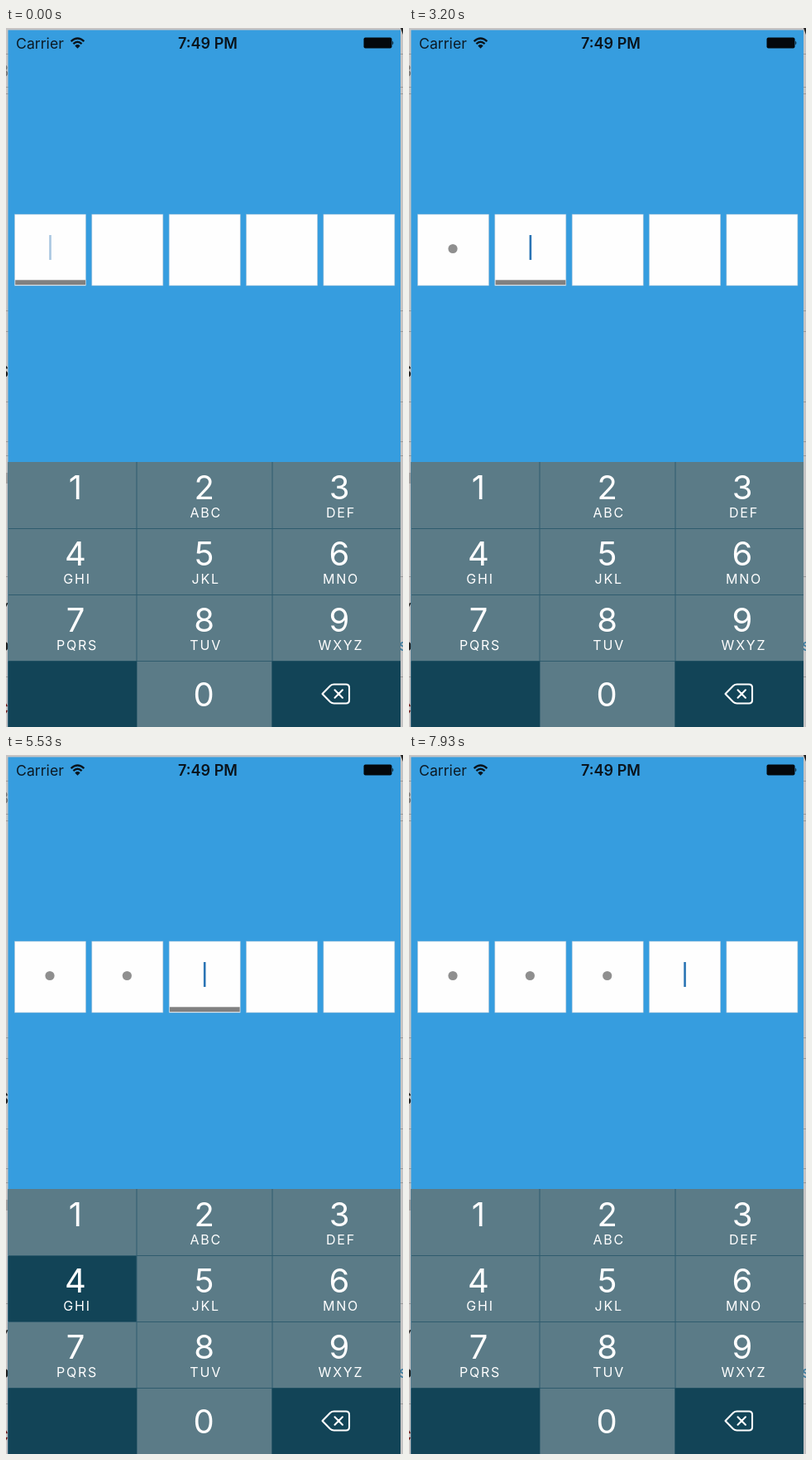
An HTML page for the animation above (8 s loop, 480 by 844 pixels).

```html
<!DOCTYPE html>
<html lang="en">
<head>
<meta charset="utf-8">
<title>Passcode entry</title>
<style>
html, body { margin: 0; width: 100%; height: 100%; overflow: hidden; background: #c6c4c4; }
svg { display: block; width: 480px; height: 844px; font-family: Inter, Roboto, sans-serif; }
.digit { font-size: 40px; fill: #fff; text-anchor: middle; }
.letters { font-size: 16px; letter-spacing: 1.8px; fill: #fff; text-anchor: middle; }
</style>
</head>
<body>
<svg id="stage" viewBox="0 0 480 844" xmlns="http://www.w3.org/2000/svg"></svg>
<script>
const LOOP = 8000;
const stage = document.getElementById('stage');

function add(tag, attrs, text) {
  const el = document.createElementNS('http://www.w3.org/2000/svg', tag);
  for (const k in attrs) el.setAttribute(k, attrs[k]);
  if (text !== undefined) el.textContent = text;
  stage.appendChild(el);
  return el;
}
const rect = (x, y, width, height, fill, more) => add('rect', { x, y, width, height, fill, ...more });
const label = (x, y, text, attrs) => add('text', { x, y, ...attrs }, text);

// Window behind the phone, visible only as thin strips
rect(0, 0, 480, 844, '#c6c4c4');
for (const y of [31, 71, 79, 341, 366, 451, 499, 516, 662, 783]) rect(0, y, 480, 1, '#9a9898');
const scrap = (x, y, text, fill, weight = 400) =>
  label(x, y, text, { fill, 'font-size': 20, 'font-weight': weight });
scrap(-9, 59, '3', '#777');
scrap(-10, 422, 'S', '#222', 700);
scrap(-10, 709, 'Y', '#333');
scrap(-9, 752, 'b', '#222', 700);
scrap(-12, 829, 'C', '#6b1a1a', 700);
scrap(476, 9, 'v', '#222', 700);
scrap(475, 752, 's', '#3a7ca0');
rect(0, 537, 3, 13, '#a3a1a1');

// Screen and status bar
rect(2.5, 2.5, 474.5, 842, '#369ddf');
label(12, 24.5, 'Carrier', { 'font-size': 17.7, fill: '#0c1a24' });
label(244, 24.5, '7:49 PM', { 'font-size': 18, 'font-weight': 600, fill: '#0a141c', 'text-anchor': 'middle' });
add('path', {
  d: 'M78.6 16.2Q86.5 8.8 94.4 16.2M81.4 19.2Q86.5 14.4 91.6 19.2',
  fill: 'none', stroke: '#0a141c', 'stroke-width': 2.3
});
add('path', { d: 'M83.3 21.4Q86.5 18.6 89.7 21.4L86.5 24.8Z', fill: '#0a141c' });
rect(432.5, 11.5, 34, 13, '#04080c', { rx: 2 });
add('path', { d: 'M467.3 15.5Q469.3 18 467.3 20.5Z', fill: '#04080c' });

// Code fields
const fields = [0, 1, 2, 3, 4].map(i => {
  const x = 10.5 + i * 93.35;
  rect(x, 225, 86, 86, '#fefefe', { stroke: '#a9c4d8', 'stroke-width': 0.6 });
  return {
    line: rect(x + 0.7, 304.3, 84.8, 5.8, '#808080'),
    caret: rect(x + 41.7, 250, 2.6, 30, '#2a74b4'),
    dot: add('circle', { cx: x + 42.5, cy: 266.5, r: 5.6, fill: '#8f8f8f' })
  };
});

// Number pad
const KEY = '#5b7b87', DARK = '#124457';
rect(2.5, 524, 474.5, 320, '#2f5c6e');
const cols = [[2.5, 155], [158.5, 163], [322.5, 154.5]];
const centers = [84, 239.7, 403];
const names = ['', 'ABC', 'DEF', 'GHI', 'JKL', 'MNO', 'PQRS', 'TUV', 'WXYZ'];
const keys = names.map((name, i) => {
  const c = i % 3, y = 524 + Math.floor(i / 3) * 80;
  const [x, w] = cols[c];
  const key = rect(x, y + (i > 2 ? 1 : 0), w, i > 2 ? 79 : 80, KEY);
  label(centers[c], y + 44.5, i + 1, { class: 'digit' });
  label(centers[c] + 2, y + 67, name, { class: 'letters' });
  return key;
});
rect(2.5, 764.5, 156, 80, DARK);
rect(158.5, 765, 163, 79, KEY);
rect(321.5, 764.5, 155.5, 80, DARK);
label(239, 819, '0', { class: 'digit' });
add('path', {
  d: 'M382.5 804L392 794.2Q394 792.5 396.5 792.5H411Q415 792.5 415 796.5V811.5Q415 815.5 411 815.5H396.5Q394 815.5 392 813.8ZM397.5 799.3L406.9 808.7M406.9 799.3L397.5 808.7',
  fill: 'none', stroke: '#fff', 'stroke-width': 2.1, 'stroke-linejoin': 'round', 'stroke-linecap': 'round'
});

// Moments at which each field takes focus
const focus = [-630, 2900, 5050, 5650];
const press = { key: keys[3], from: 5470, to: 5630 };
const leave = 7900;

// Caret: steady, fade out, short gap, fade in
function blink(ms) {
  const p = ms % 1000;
  if (p < 500) return 1;
  if (p < 720) return (720 - p) / 220;
  return p < 800 ? 0 : (p - 800) / 200;
}

function draw(t) {
  let active = 0;
  focus.forEach((at, i) => { if (t >= at) active = i; });
  fields.forEach((f, i) => {
    const on = i === active;
    f.dot.setAttribute('opacity', i < active ? 1 : 0);
    f.line.setAttribute('opacity', on && t < leave ? 1 : 0);
    f.caret.setAttribute('opacity', on ? blink(t - focus[i]) : 0);
  });
  press.key.setAttribute('fill', t >= press.from && t < press.to ? DARK : KEY);
}

const start = performance.now();
function tick() {
  draw((performance.now() - start) % LOOP);
  requestAnimationFrame(tick);
}
draw(0);
requestAnimationFrame(tick);
</script>
</body>
</html>
```
